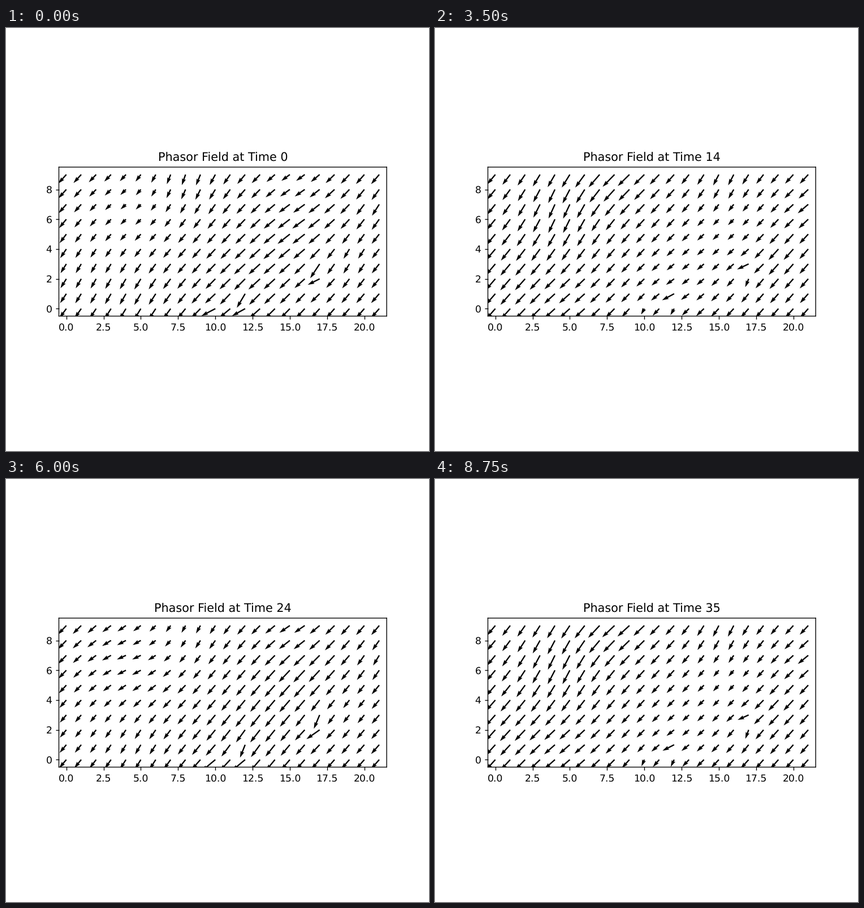
Animation, 748 px wide and 748 px high, one loop 9 s. Source, as a matplotlib script:

```python
import numpy as np
import matplotlib.pyplot as plt
from matplotlib.animation import FuncAnimation

plt.rcParams["text.hinting"] = "no_hinting"

STAGE = 748
COLS, ROWS = 22, 10
FRAMES, STEP_MS = 36, 250
DRIFT = -14.2 - 16j              # steady part of every arrow
OMEGA = np.radians(16.75)        # phase gained per step

# Oscillating patches: x, y, radius, strength, phase in degrees
PATCHES = [
    (4.5, 7, 2.2, 9, 62),
    (8, 9.3, 2, 8, -28),
    (1, 2.5, 2.3, 4.5, 0),
    (5, 0.8, 2, 4, -60),
    (12.5, 1.7, 2.1, 6, -158),
    (16, 5.8, 2.1, 7.5, 185),
    (15.5, 9, 1.5, 6, 72),
    (19, 3.8, 1.3, 6, -5),
    (21, 7, 1, 4, -60),
    (10, 0, 0.5, 9, 150),
    (12, 0, 0.5, 8, 131),
    (12, 1, 0.5, 9, -50),
    (17, 2, 0.5, 9, 125),
    (17, 3, 0.5, 9, -88),
]

x, y = np.meshgrid(np.arange(COLS), np.arange(ROWS))


def patch(px, py, radius, strength, deg):
    dist2 = (x - px) ** 2 + (y - py) ** 2
    return strength * np.exp(-dist2 / (2 * radius ** 2) + 1j * np.radians(deg))


wave = sum(patch(*p) for p in PATCHES)


def arrows(step):
    return DRIFT + wave * np.exp(1j * OMEGA * step)


fig, ax = plt.subplots(figsize=(6, 6), dpi=STAGE / 6)
ax.set(aspect="equal", xlim=(-0.5, COLS - 0.5), ylim=(-0.5, ROWS - 0.5))

# Unsnapped lines keep their soft, fractional width
for spine in ax.spines.values():
    spine.set_snap(False)
for tick in ax.get_xticklines() + ax.get_yticklines():
    tick.set_snap(False)

start = arrows(0)
quiver = ax.quiver(x, y, start.real, start.imag)
title = ax.set_title("Phasor Field at Time 0")


def update(step):
    v = arrows(step)
    quiver.set_UVC(v.real, v.imag)
    title.set_text(f"Phasor Field at Time {step}")
    return quiver, title


anim = FuncAnimation(fig, update, frames=FRAMES, interval=STEP_MS,
                     repeat=True, repeat_delay=0, blit=False)
plt.show()
```
